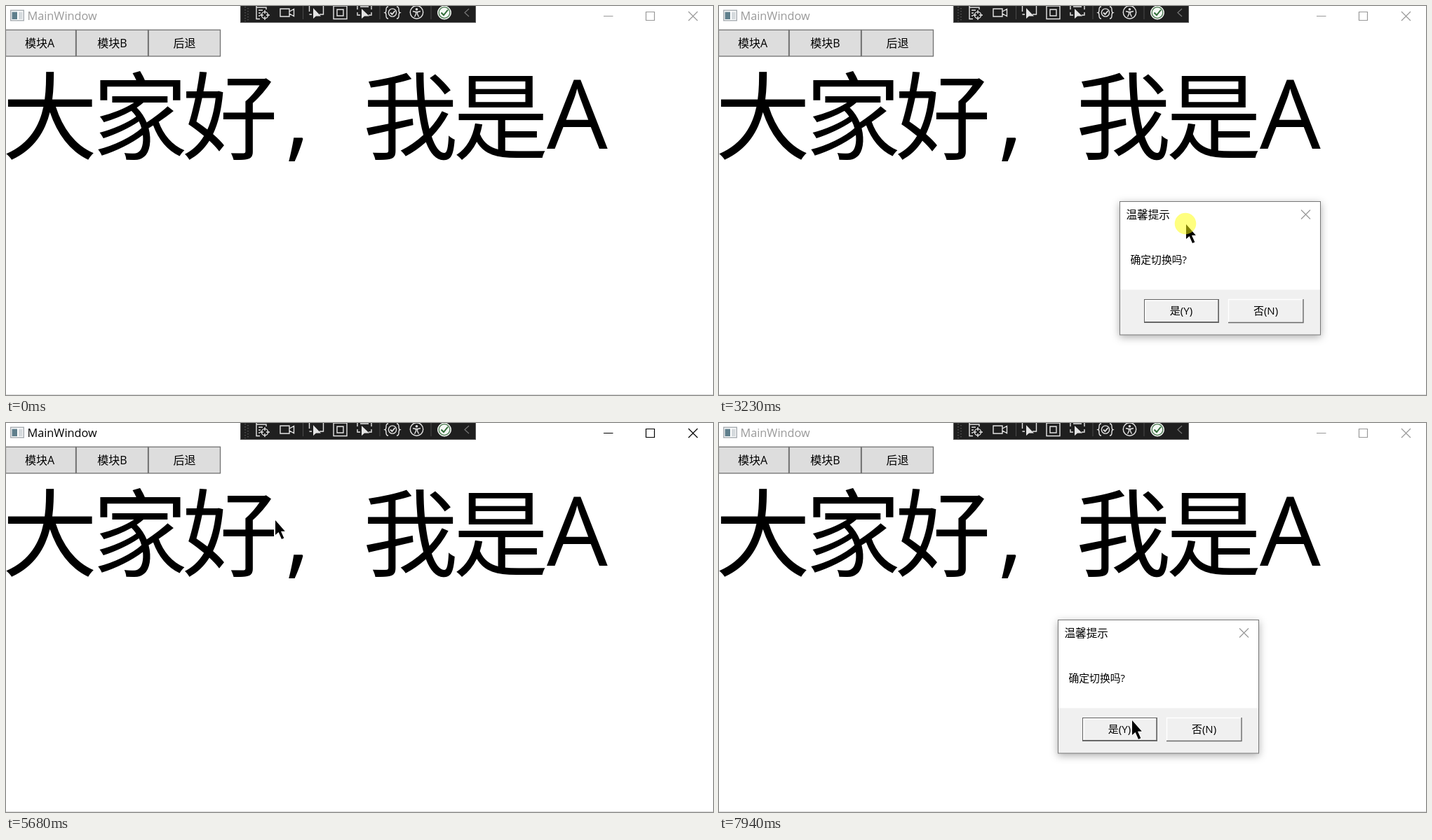
These frames come from a looping animation (1008 px wide and 556 px high, 8 s). An HTML page:

```html
<!DOCTYPE html>
<html lang="zh-CN">
<head>
<meta charset="utf-8">
<title>MainWindow</title>
<style>
html, body { margin: 0; width: 100%; height: 100%; overflow: hidden; background: #fff; }
svg { display: block; width: 1008px; height: 556px; font: 16px "Open Sans", "Noto Sans CJK SC", "Noto Sans CJK", sans-serif; }
.mid { text-anchor: middle; }
.big { font-size: 137px; }
.han { font: 136px "Noto Sans CJK SC", "Noto Sans CJK", sans-serif; }
.btn { fill: #ddd; stroke: #707070; stroke-width: 1.3; }
.btn.hover { fill: #bee6fd; stroke: #3c7fb1; }
.btn.down { fill: #c4e5f6; stroke: #2c628b; }
.line { fill: none; stroke: currentColor; stroke-width: 1.2; }
#dialog { filter: drop-shadow(0 3px 6px rgba(0, 0, 0, .32)); }
</style>
</head>
<body>
<svg viewBox="0 0 1008 556">
  <path d="M0 555.5H1008" stroke="#dcdcdc"/>

  <!-- title bar -->
  <g>
    <rect x="6.7" y="6.2" width="18.6" height="14.6" fill="#fff" stroke="#a5abb0" stroke-width="1.4"/>
    <rect x="8.5" y="8.5" width="7.5" height="10.5" fill="#5f7f8c"/>
    <rect x="18" y="8.5" width="5.5" height="10.5" fill="#d5dadd"/>
  </g>
  <g id="chrome">
    <text x="30.5" y="20" font-size="16.3" fill="currentColor">MainWindow</text>
    <path class="line" d="M852 14.5H865.500M912.500 8.500H924.500V20.500H912.500ZM973 8L986 21M986 8L973 21"/>
  </g>

  <!-- toolbar -->
  <rect x="334.500" y="-1" width="335" height="24.500" fill="#1f1f1f" stroke="#555"/>
  <path d="M341 1V22M345 3V22" stroke="#666" stroke-width="1.3" stroke-dasharray="1.300 2.700"/>
  <path d="M423.500 0V19M533 0V19M606 0V19" stroke="#4a4a4a"/>
  <g fill="none" stroke="#e4e4e4" stroke-width="1.4">
    <path d="M362 18.500H357V0M357 2H371V5M360 6H366M360 10H363M360 14H362"/>
    <circle cx="369" cy="13" r="4.600"/>
    <path d="M369 6V11M369 15V20M362 13H367M371 13H376"/>
    <path d="M391 4H404V15H391ZM404 8L410.500 4.500V14.500L404 11"/>
    <path d="M432.500 8V0M452.500 0V12H447M432.500 12H436"/>
    <path d="M467 0H486V18.500H467ZM472 5H481V14H472Z"/>
    <path d="M501 5V0M521 0V5M501 9V13H505M521 9V13H517M505 1H517"/>
    <path d="M545 1Q542 1 542 5Q542 9 540.500 9.500Q542 10 542 14Q542 18 545 18M557 1Q560 1 560 5Q560 9 561.500 9.500Q560 10 560 14Q560 18 557 18"/>
    <circle cx="551" cy="9.500" r="5.600"/>
    <path d="M548 9.500L550.500 12L554.500 7" stroke-width="1.800"/>
    <circle cx="585.500" cy="9" r="9.200"/>
    <path d="M580 7.500L584 8.500H587L591 7.500M584.500 8.500V11.500L582.500 15.500M586.500 8.500V11.500L588.500 15.500"/>
  </g>
  <path d="M438 3V18L442 14.500H449ZM507 4V18L511 14.500H518Z" fill="#e4e4e4"/>
  <circle cx="585.500" cy="4.800" r="1.800" fill="#e4e4e4"/>
  <circle cx="625" cy="9.500" r="9.500" fill="#e9efe9" stroke="#fff"/>
  <circle cx="625" cy="9.500" r="7.800" fill="#f4f8f4" stroke="#4d7a52" stroke-width="1.300"/>
  <path d="M620.500 9.500L624 13L630 5.500" fill="none" stroke="#2f6b36" stroke-width="2"/>
  <path d="M660 4L654 9.500L660 15" fill="none" stroke="#777" stroke-width="1.200"/>

  <!-- module buttons -->
  <rect class="btn" x="-.500" y="34.200" width="100" height="37.600"/>
  <rect class="btn" x="100.200" y="34.200" width="102.300" height="37.600"/>
  <rect class="btn" x="203.200" y="34.200" width="102.300" height="37.600"/>
  <g class="mid">
    <text x="48" y="58.700">模块A</text>
    <text x="151.500" y="58.700">模块B</text>
    <text x="254.500" y="58.700">后退</text>
  </g>

  <!-- pages -->
  <g id="pageA">
    <text class="han" y="209" x="-5.500 123 251.500">大家好</text>
    <text class="big" x="399" y="204">,</text>
    <text class="han" y="209" x="508.500 637.500">我是</text>
    <text class="big" x="771" y="204">A</text>
  </g>
  <g id="pageB">
    <text class="han" y="209" x="-6 122 251 379.500">我是模块</text>
    <text class="big" x="513" y="203.500">B</text>
  </g>

  <g id="dialog">
    <rect x=".500" y=".500" width="286" height="190.500" fill="#fff"/>
    <rect x="1" y="126.500" width="285" height="64" fill="#f0f0f0"/>
    <rect x=".500" y=".500" width="286" height="190.500" fill="none" stroke="#777"/>
    <text x="9.500" y="25" font-size="15.600">温馨提示</text>
    <path class="line" d="M259 12.500L272 25.500M272 12.500L259 25.500" color="#999"/>
    <text x="15.500" y="88.500" font-size="14.800">确定切换吗?</text>
    <rect x="35.500" y="140.500" width="106" height="33" fill="#f0f0f0" stroke="#646464"/>
    <path d="M37 172V142H140" fill="none" stroke="#fff" stroke-width="1.400"/>
    <path d="M36 172.700H141V141" fill="none" stroke="#696969" stroke-width="1.500"/>
    <path d="M155.500 173V140.500H262" fill="none" stroke="#fff" stroke-width="1.400"/>
    <path d="M155 173.500H262V140" fill="none" stroke="#696969" stroke-width="1.400"/>
    <g class="mid" font-size="15">
      <text x="88" y="162.300">是(Y)</text>
      <text x="208.500" y="162.300">否(N)</text>
    </g>
  </g>

  <g id="cursor">
    <path d="M0 0V21L4.600 17L9 27L12.300 25.500L8 15.800H13.800Z" stroke="#fff" stroke-width="1.200" paint-order="stroke"/>
    <circle id="press" cx="-1" cy="-1" r="15.300" fill="#ff0" fill-opacity=".5"/>
  </g>
</svg>
<script>
const LOOP = 8000;
const $ = id => document.getElementById(id);
const chrome = $('chrome'), pageA = $('pageA'), pageB = $('pageB');
const dialog = $('dialog'), cursor = $('cursor'), press = $('press');
const buttons = [...document.querySelectorAll('.btn')];

// Keys are [time, x, y]; spans are [start, end).
const cursorKeys = [
  [100, 880, 560], [800, 155, 58],
  [1130, 155, 58], [1460, 1012, 398],
  [2780, 910, 590], [3220, 666, 312],
  [3300, 666, 312], [3570, 664, 433],
  [4230, 664, 433], [4740, 50, 56],
  [5080, 50, 56], [5680, 384, 139],
  [5720, 384, 139], [6020, 145, 75],
  [6150, 145, 75], [6300, 148, 58],
  [6440, 148, 58], [6780, 850, 340],
  [7280, 759, 589], [7660, 578, 314],
  [7700, 578, 314], [7930, 589, 425]
];
const dialogKeys = [
  [2780, 815, 557], [3220, 571, 279],
  [7280, 664, 556], [7660, 483, 281]
];
const cursorShown = [[100, 1450], [2800, 6750], [7300, LOOP]];
const dialogShown = [[2800, 4055], [7300, LOOP]];
const pressed = [[930, 1060], [2800, 3290], [3640, 3780], [4940, 5060], [6290, 6410], [7300, 7690]];
const active = [[130, 1130], [3880, 6430]];
const onPageB = [[3880, 5080]];

const during = (spans, t) => spans.some(([a, b]) => t >= a && t < b);
const show = (el, on) => { el.style.display = on ? '' : 'none'; };
const clamp = v => Math.max(0, Math.min(1, v));

function at(keys, t) {
  const i = keys.findIndex(k => k[0] > t);
  if (i < 0) return keys[keys.length - 1].slice(1);
  if (i === 0) return keys[0].slice(1);
  const [t0, x0, y0] = keys[i - 1], [t1, x1, y1] = keys[i];
  const p = (t - t0) / (t1 - t0), e = p * p * (3 - 2 * p);
  return [x0 + (x1 - x0) * e, y0 + (y1 - y0) * e];
}

function draw(t) {
  const isActive = during(active, t), isDown = during(pressed, t);
  chrome.style.color = isActive ? '#000' : '#999';
  show(pageA, !during(onPageB, t));
  show(pageB, during(onPageB, t));

  const [cx, cy] = at(cursorKeys, t), visible = during(cursorShown, t);
  show(cursor, visible);
  show(press, isDown);
  cursor.setAttribute('transform', `translate(${cx} ${cy})`);
  buttons.forEach((b, i) => {
    const left = [0, 100, 203][i];
    const over = visible && isActive && cy > 34 && cy < 72 && cx >= left && cx < left + 102 - 2 * (i === 0);
    b.classList.toggle('hover', over);
    b.classList.toggle('down', over && isDown);
  });

  // Closing fades the dialog while it shrinks a little.
  const out = t < 5000 ? clamp((t - 3890) / 165) : 0;
  const [dx, dy] = at(dialogKeys, t < 5000 ? Math.min(t, 3220) : t);
  show(dialog, during(dialogShown, t));
  dialog.setAttribute('transform', `translate(${dx + 1.6 * out} ${dy + 1.6 * out}) scale(${1 - .044 * out})`);
  dialog.setAttribute('opacity', 1 - out);
}

const start = performance.now();
function tick() {
  draw((performance.now() - start) % LOOP);
  requestAnimationFrame(tick);
}
tick();
</script>
</body>
</html>
```
